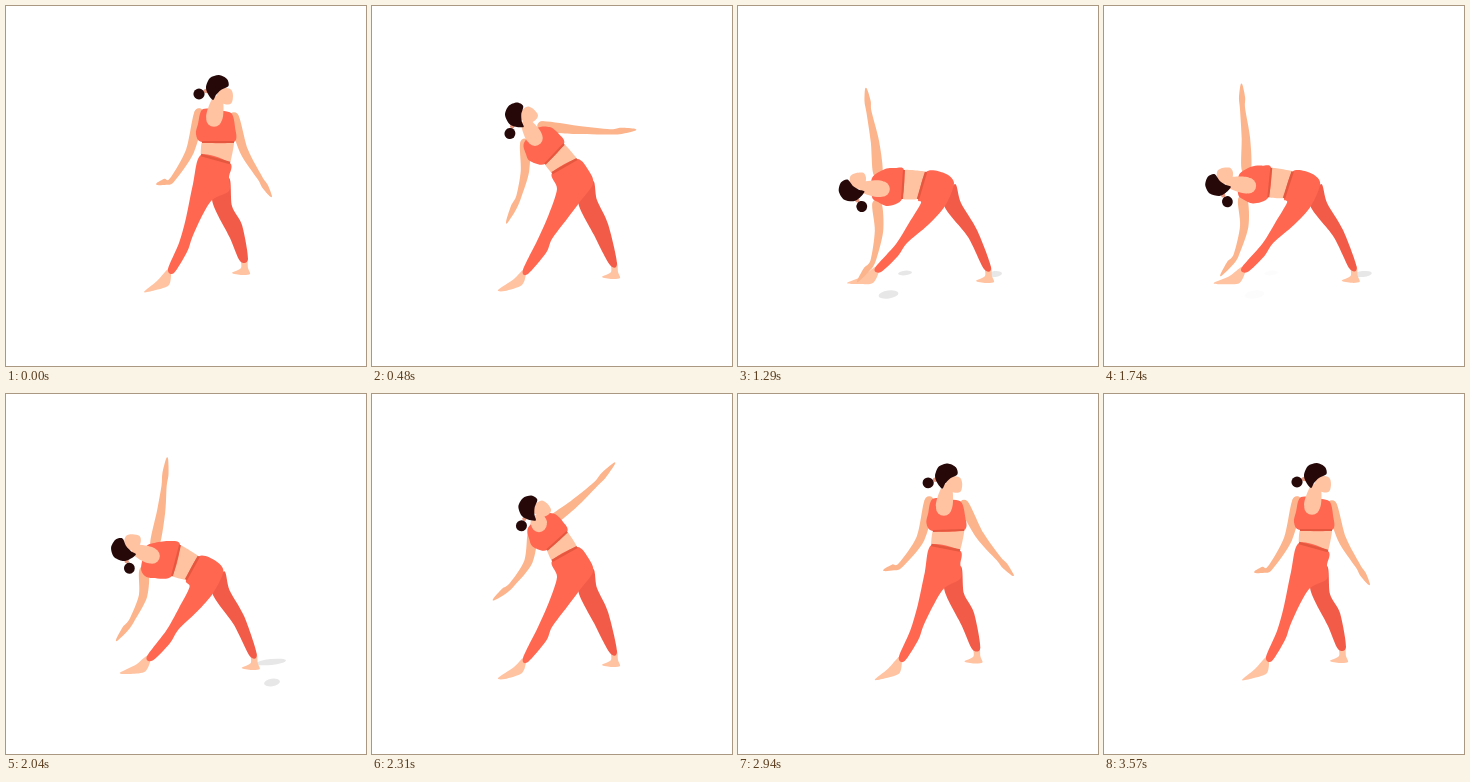
These frames come from a looping animation (360x360 px, 3600 ms). An HTML page with a canvas:

```html
<!DOCTYPE html>
<html lang="en">
<head>
<meta charset="utf-8">
<title>Triangle pose</title>
<style>
html, body { margin: 0; width: 100%; height: 100%; overflow: hidden; background: #fff; }
canvas { display: block; width: 360px; height: 360px; }
</style>
</head>
<body>
<canvas id="stage" width="360" height="360"></canvas>
<script>
const ctx = document.getElementById('stage').getContext('2d');
const LOOP = 3600;
const SKIN = '#fcb48d', LIGHT = '#ffc3a2', CORAL = '#ff6751', CORAL_DARK = '#f25b48',
      BAND = '#e5573f', HAIR = '#260809', SHADOW = '#e7e7e7';

// Outlines: standing, leaning, folded
const FRONT_LEG = [
  [195,149, 187,178, 180,212, 173,237, 162,263, 168,267, 181,246, 186,232, 195,212, 206,194, 223,185, 223,171, 224,157],
  [180,167, 185,183, 177,208, 166,233, 151,264, 156,268, 174,247, 180,233, 195,213, 207,197, 221,178, 217,165, 205,153],
  [180,193, 183,197, 171,217, 158,238, 137,262, 143,266, 160,250, 169,237, 190,219, 207,200, 216,177, 206,167, 188,166]
];
const BACK_LEG = [
  [223,172, 226,200, 236,219, 242,253, 234,255, 224,232, 206,193],
  [221,175, 225,194, 236,218, 245,257, 238,259, 222,229, 206,195],
  [217,178, 223,197, 239,224, 253,261, 246,263, 230,231, 206,199]
];
const FRONT_FOOT = [
  [162,263, 151,275, 138,286, 150,284, 163,279, 165,266],
  [151,264, 142,273, 126,284, 133,285, 150,279, 154,267],
  [137,261, 125,270, 109,277, 122,278, 135,277, 141,265]
];
const BACK_FOOT = [1,-2, 1,7, -8,12, 2,14, 10,13, 8,7, 7,-2];

// Eight outline points of the top, then the base of the neck; one more half-folded pose
const TOP = [
  [197,103, 192,118, 190,128, 196,136, 228,136, 229,121, 226,108, 218,105, 208,113],
  [152,137, 154,148, 158,155, 173,158, 192,138, 187,128, 178,121, 165,122, 163,132],
  [135,174, 139,182, 147,184, 166,182, 174,151, 163,147, 148,149, 140,153, 146,162],
  [134,191, 140,196, 150,200, 164,193, 166,164, 157,162, 147,163, 134,172, 144,183]
];

// Tracks: time, then values
const legTrack = [[0,0], [480,1], [780,1.78], [1290,2], [1600,2], [2040,1.72], [2580,.32], [3270,.02]];
const topTrack = [[0,0], [480,1], [780,2.6], [1290,3], [1600,3], [2040,2], [2580,.15], [3270,.01]];
const headTrack = [
  [0,211,79,0], [480,143,108,-49], [780,112,170,-92], [1290,111,185,-103],
  [1600,111,184,-102], [2040,115,156,-88], [2580,199,81,-5], [3270,211,79,0]
];
const lowArm = polar([
  [0, 193,107, 184,145, 166,174, 151,178],
  [480, 153,137, 153,165, 147,190, 135,216],
  [780, 139,189, 142,215, 137,242, 127,262],
  [1290, 139,198, 141,225, 135,255, 120,275],
  [1600, 139,197, 141,224, 134,254, 119,274],
  [2040, 138,177, 137,202, 126,226, 111,246],
  [2580, 186,107, 178,143, 157,166, 138,174],
  [3270, 193,107, 184,145, 166,174, 151,178]
]);
const highArm = polar([
  [0, 228,111, 238,145, 254,172, 265,190],
  [480, 170,120, 205,124, 238,126, 263,124],
  [780, 146,157, 157,128, 167,98, 173,76],
  [1290, 140,167, 137,136, 131,106, 128,83],
  [1600, 141,166, 139,135, 134,105, 132,82],
  [2040, 149,150, 155,118, 158,92, 161,65],
  [2190, 158,140, 171,112, 181,84, 189,56],
  [2580, 220,110, 247,128, 271,141, 294,151],
  [3270, 228,111, 238,145, 254,172, 265,190]
]);
// Shadow right edge and opacity
const footShadow = [[0,288,0], [560,288,0], [600,286,1], [780,275,1], [1290,264,1], [1600,264,1], [2040,280,1], [2140,280,0]];

// Joint positions to shoulder plus angle and length of each segment
function polar(rows) {
  return rows.map(([t, ...p]) => {
    const out = [t, p[0], p[1]];
    for (let i = 2; i < p.length; i += 2) {
      const dx = p[i] - p[i - 2], dy = p[i + 1] - p[i - 1];
      out.push(Math.atan2(dy, dx), Math.hypot(dx, dy));
    }
    return out;
  });
}

// Monotone cubic interpolation of every column
function sample(track, t) {
  const rows = [...track, [LOOP, ...track[0].slice(1)]];
  let i = 0;
  while (rows[i + 1][0] <= t) i++;
  const span = rows[i + 1][0] - rows[i][0], s = (t - rows[i][0]) / span;
  return rows[0].slice(1).map((_, c) => {
    const v = k => rows[k][c + 1];
    const slope = k => (v(k + 1) - v(k)) / (rows[k + 1][0] - rows[k][0]);
    const tangent = k => {
      if (k < 1 || k > rows.length - 2) return 0;
      const a = slope(k - 1), b = slope(k);
      return a * b <= 0 ? 0 : 2 * a * b / (a + b);
    };
    const d = v(i + 1) - v(i), m0 = tangent(i) * span, m1 = tangent(i + 1) * span;
    return v(i) + s * (m0 + s * (3 * d - 2 * m0 - m1 + s * (m0 + m1 - 2 * d)));
  });
}

function blend(poses, k) {
  const i = Math.min(Math.floor(k), poses.length - 2), f = k - i;
  return poses[i].map((v, j) => v + (poses[i + 1][j] - v) * f);
}

// Closed smooth outline through flat x,y pairs
function shape(p, color, tension = 7) {
  const n = p.length / 2, at = i => [p[(i + n) % n * 2], p[(i + n) % n * 2 + 1]];
  ctx.beginPath();
  ctx.moveTo(p[0], p[1]);
  for (let i = 0; i < n; i++) {
    const [a, b, c, d] = [at(i - 1), at(i), at(i + 1), at(i + 2)];
    ctx.bezierCurveTo(b[0] + (c[0] - a[0]) / tension, b[1] + (c[1] - a[1]) / tension,
                      c[0] - (d[0] - b[0]) / tension, c[1] - (d[1] - b[1]) / tension, c[0], c[1]);
  }
  ctx.fillStyle = color;
  ctx.fill();
}

function ellipse(x, y, rx, ry, color, angle = 0) {
  ctx.beginPath();
  ctx.ellipse(x, y, rx, ry, angle, 0, 7);
  ctx.fillStyle = color;
  ctx.fill();
}

function line(x1, y1, x2, y2, width, color) {
  ctx.beginPath();
  ctx.moveTo(x1, y1);
  ctx.lineTo(x2, y2);
  ctx.lineWidth = width;
  ctx.strokeStyle = color;
  ctx.stroke();
}

// Tapered limb along points [x, y, radius]
function limb(points, color) {
  const left = [], right = [];
  points.forEach(([x, y, r], i) => {
    const a = points[Math.max(i - 1, 0)], b = points[Math.min(i + 1, points.length - 1)];
    const len = Math.hypot(b[0] - a[0], b[1] - a[1]);
    const nx = (a[1] - b[1]) / len * r, ny = (b[0] - a[0]) / len * r;
    left.push(x + nx, y + ny);
    right.unshift(x - nx, y - ny);
  });
  shape([...left, ...right], color);
  ellipse(...points[0].slice(0, 2), points[0][2], points[0][2], color);
}

function arm(track, t) {
  const [x, y, ...seg] = sample(track, t);
  const pts = [[x, y, 4.7]];
  [4.2, 2.6, 1].forEach((r, i) => {
    const [px, py] = pts[pts.length - 1], a = seg[2 * i], len = seg[2 * i + 1];
    const step = f => [px + Math.cos(a) * len * f, py + Math.sin(a) * len * f];
    if (i === 2) pts.push([...step(.45), 3.1], [...step(1), r]);
    else pts.push([...step(1), r]);
  });
  limb(pts, SKIN);
}

function shadows(t) {
  const [edge, alpha] = sample(footShadow, t);
  const fade = (from, to) => Math.max(0, Math.min(1, (t - from) / 80, (to - t) / 80));
  ctx.globalAlpha = alpha;
  ellipse((edge + 250) / 2, 268, (edge - 250) / 2, 3, SHADOW, -.1);
  ctx.globalAlpha = fade(600, 1750);
  ellipse(175 - 8 * Math.max(0, Math.min(1, (t - 780) / 510)), 267, 7, 2.3, SHADOW, -.1);
  ctx.globalAlpha = fade(950, 1750);
  ellipse(150.5, 288.5, 10, 4, SHADOW, -.15);
  ctx.globalAlpha = fade(1750, 2150);
  ellipse(266, 288.5, 8, 3.8, SHADOW, -.15);
  ctx.globalAlpha = 1;
}

function head(x, y, angle) {
  ctx.save();
  ctx.translate(x, y);
  ctx.rotate(angle);
  shape([0,5, 9,3, 14.5,5, 16,11, 14.5,18, 9,19.5, 2,16], LIGHT);
  ellipse(-11, 6, 2.2, 2.2, '#e99a80');
  shape([-11,2, -7,-7, 2,-10, 10,-6, 11.5,1, 4,5, -1,10, -4,15, -9,9], HAIR);
  ellipse(-18, 9, 5.6, 5.4, HAIR);
  ctx.restore();
}

function draw() {
  const t = performance.now() % LOOP;
  const [lean] = sample(legTrack, t), [fold] = sample(topTrack, t);
  const [hx, hy, degrees] = sample(headTrack, t), turn = degrees * Math.PI / 180;
  const leg = blend(FRONT_LEG, lean), back = blend(BACK_LEG, lean), top = blend(TOP, fold);
  const neckX = top[16], neckY = top[17], bra = top.slice(0, 16);
  const waist = [leg[0], leg[1], leg[24], leg[25]];

  ctx.clearRect(0, 0, 360, 360);
  shadows(t);
  shape(BACK_FOOT.map((v, i) => v + back[8 + i % 2]), LIGHT);
  shape(blend(FRONT_FOOT, lean), LIGHT);
  shape(back, CORAL_DARK);
  arm(highArm, t);
  arm(lowArm, t);
  shape([...top.slice(6, 10), waist[2], waist[3], waist[0], waist[1]], LIGHT, 40);
  shape(leg, CORAL);
  line(...waist, 2.5, BAND);
  shape(bra, CORAL);
  line(...top.slice(6, 10), 2, BAND);

  const c = Math.cos(turn), s = Math.sin(turn);
  limb([[neckX, neckY, 7.8], [hx + c - 13 * s, hy + s + 13 * c, 4.8]], LIGHT);
  head(hx, hy, turn);
  requestAnimationFrame(draw);
}
draw();
</script>
</body>
</html>
```
